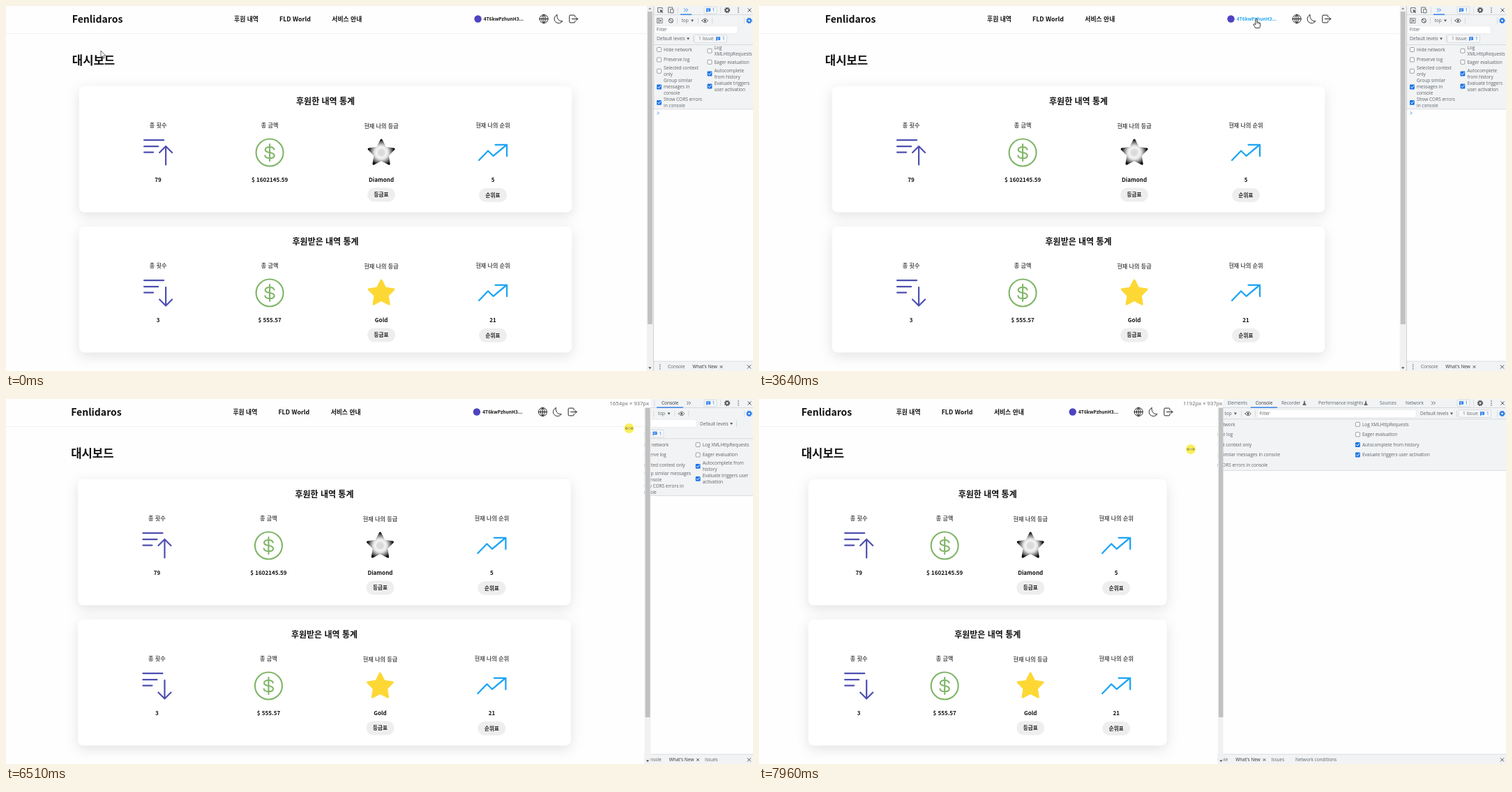
Animation, 1071 px wide and 523 px high, one loop 8 s. Source, as an HTML page:

```html
<!DOCTYPE html>
<html lang="ko">
<head>
<meta charset="utf-8">
<title>Dashboard resize</title>
<style>
html, body { margin: 0; width: 100%; height: 100%; overflow: hidden; background: #fefefe; }
svg { display: block; }
text { white-space: pre; }
.page text { font-family: "Noto Sans CJK KR", "Noto Sans KR", "Noto Sans CJK JP", "Noto Sans CJK", sans-serif; font-weight: 700; }
.ui text { font-family: "Open Sans", "Noto Sans", sans-serif; }
.card { fill: #fff; filter: drop-shadow(0 5px 9px rgba(0, 0, 0, .11)); }
</style>
</head>
<body>
<svg width="1071" height="523" viewBox="0 0 1071 523">
  <defs>
    <radialGradient id="diamond" gradientUnits="userSpaceOnUse" cx="0" cy="0" r="20">
      <stop offset="0" stop-color="#d8d8d8"/><stop offset=".25" stop-color="#dedede"/>
      <stop offset=".33" stop-color="#f6f6f6"/><stop offset=".5" stop-color="#e2e2e2"/>
      <stop offset=".72" stop-color="#7c7c7c"/><stop offset=".93" stop-color="#080808"/>
    </radialGradient>
  </defs>
  <rect width="1071" height="523" fill="#fefefe"/>
  <g id="panel" class="ui"></g>
  <svg id="view" height="523"><g id="page" class="page"></g><g id="chrome" class="ui"></g></svg>
  <g id="cursor"></g>
</svg>
<script>
const LOOP = 8000, SCALE = 1071 / 1920, RIGHT = 1071;
const BLUE = '#1a73e8', HOVER = '#1da5f2', GREY = '#5f6368', LINE = '#cdd0d4';

// Tracks: [time, value, ...] joined by straight segments.
const pointerTrack = [[0, 136, 64], [200, 136, 64], [970, 191, 18], [1800, 386, 18], [2360, 454, 19],
  [2640, 505, 19], [3500, 700, 19], [4330, 776, 18], [4610, 792, 18], [4810, 792, 18], [5020, 812, 18],
  [5220, 812, 18], [5840, 930, 35], [6300, 930, 35], [6510, 893.5, 42], [6840, 857.5, 52],
  [7090, 838, 58], [7360, 732, 66], [7960, 619, 72]];
// Values: viewport width, visible page edge, panel layout edge.
const resizeTrack = [[6300, 925.7, 928, 928], [6510, 922.6, 924.6, 894.5], [6840, 862.4, 859.3, 859.3],
  [7090, 851, 851, 841], [7360, 793.2, 794, 749], [7960, 664.9, 665.5, 627]];

function sample(track, t) {
  let i = track.findIndex(k => k[0] > t);
  if (i < 0) return track[track.length - 1].slice(1);
  if (i === 0) return track[0].slice(1);
  const a = track[i - 1], b = track[i], u = (t - a[0]) / (b[0] - a[0]);
  return a.slice(1).map((v, j) => v + (b[j + 1] - v) * u);
}

const text = (x, y, s, size, fill = '#111', anchor = 'start') =>
  `<text x="${x}" y="${y + size * .37}" font-size="${size}" fill="${fill}" text-anchor="${anchor}">${s}</text>`;
const rect = (x, y, w, h, fill, extra = '') =>
  `<rect x="${x}" y="${y}" width="${Math.max(0, w)}" height="${h}" fill="${fill}" ${extra}/>`;
const stroke = (d, color, width = 1) =>
  `<path d="${d}" fill="none" stroke="${color}" stroke-width="${width}" stroke-linecap="round" stroke-linejoin="round"/>`;
const fillPath = (d, color, extra = '') => `<path d="${d}" fill="${color}" ${extra}/>`;
const circle = (x, y, r, fill, extra = '') => `<circle cx="${x}" cy="${y}" r="${r}" fill="${fill}" ${extra}/>`;
const at = (x, y, s) => `<g transform="translate(${x} ${y})">${s}</g>`;

// Page

const star = fill => {
  const pts = Array.from({ length: 10 }, (_, i) => {
    const r = i % 2 ? 9.6 : 18.9, a = i * Math.PI / 5;
    return `${(r * Math.sin(a)).toFixed(2)},${(.9 - r * Math.cos(a)).toFixed(2)}`;
  });
  return `<polygon points="${pts.join(' ')}" fill="${fill}" stroke="${fill}" stroke-width="3" stroke-linejoin="round"/>`;
};
const listIcon = up => stroke('M-20 -17.8H8M-20 -8.8H0M-20 -.4H-7' +
  (up ? 'M11 17.5V-9M2 0L11 -9L20 0' : 'M11 -8V18.3M2 9.5L11 18.5L20 9.5'), '#4d4fb0', 2.2);
const dollarIcon = circle(0, 0, 19.5, 'none', 'stroke="#7fb566" stroke-width="2.1"') +
  stroke('M6.4 -4.4C5.6 -7 3.2 -8 0 -8C-4 -8 -6.4 -6.4 -6.4 -4C-6.4 -1.2 -3.4 -.6 0 0C4 .7 6.7 1.4 6.7 4.3C6.7 7 4 8.2 0 8.2C-3.6 8.2 -6.2 7 -6.7 4.4M0 -12V12', '#7fb566', 2.1);
const chartIcon = stroke('M-20 11L-7 -2.5L.5 4.8L19.5 -11M3.5 -11.2H20V5', HOVER, 2.3);

const cards = [
  { y: 0, title: '후원한 내역 통계', icons: [listIcon(true), dollarIcon, star('url(#diamond)'), chartIcon], values: ['79', '$ 1602145.59', 'Diamond', '5'] },
  { y: 201, title: '후원받은 내역 통계', icons: [listIcon(false), dollarIcon, star('#fdd835'), chartIcon], values: ['3', '$ 555.57', 'Gold', '21'] }
];
const labels = ['총 횟수', '총 금액', '현재 나의 등급', '현재 나의 순위'];
const buttons = ['', '', '등급표', '순위표'];

function card({ y, title, icons, values }, c, half, gap) {
  let s = rect(c - half, 115 + y, half * 2, 180.5, '#fff', 'rx="8" class="card"') +
    text(c, 137 + y, title, 12, '#111', 'middle');
  labels.forEach((label, i) => {
    const x = c + (i - 1.5) * gap, third = i === 2 ? .6 : 0;
    s += text(x, 171 + third + y, label, 8.15, '#555', 'middle') + at(x, 210 + y, icons[i]) +
      text(x, 249 + y, values[i], 8.05, '#111', 'middle');
    if (buttons[i]) {
      const by = 271 - third + y;
      s += rect(x - 20, by - 10, 40, 20, '#eee', 'rx="10"') + text(x, by, buttons[i], 7.6, '#222', 'middle');
    }
  });
  return s;
}

const globe = 'M-6 0A6 6 0 1 0 6 0A6 6 0 1 0 -6 0ZM-6 0H6M0 -6V6M0 -6C-4 -3 -4 3 0 6M0 -6C4 -3 4 3 0 6';
const moon = 'M-2.2 -5.7C-2.5 0 1 4 5.8 3C4 6.2 -.8 7.2 -4 4.4C-7.4 1.2 -6 -4 -2.2 -5.7Z';
const logout = 'M2 -2.6V-4.2Q2 -5.4 .8 -5.4H-4.8Q-6 -5.4 -6 -4.2V4.2Q-6 5.4 -4.8 5.4H.8Q2 5.4 2 4.2V2.6M-2.4 0H6M3.6 -2.4L6 0L3.6 2.4';

function drawPage(width, hot) {
  const c = width / 2 - 1, wide = width > 803;
  const half = wide ? 353.3 : 257, gap = wide ? 160 : 123;
  const edge = half + 10, shift = wide ? 0 : -96.5;
  const ink = name => hot === name ? HOVER : '#111';
  const icon = (dx, d, name) => at(c + dx + shift, 18.5, stroke(d, hot === name ? HOVER : '#222'));
  return rect(0, 0, width, 523, '#fefefe') + rect(0, 39, width, .7, '#ececec') +
    text(c - edge, 19, 'Fenlidaros', 14) +
    text(c - 131, 19, '후원 내역', 8.8, ink('nav1')) +
    text(c - 66, 19, 'FLD World', 8.8, ink('nav2')) +
    text(c + 9.2, 19, '서비스 안내', 8.8, ink('nav3')) +
    circle(c + 218.5 + shift, 18.5, 5.2, '#4e44c0') +
    text(c + 226.7 + shift, 18.7, '4T6kwPzhunH3...', 6.6, ink('wallet')) +
    icon(313, globe, 'globe') + icon(334, moon, 'moon') + icon(355.7, logout, 'logout') +
    text(c - edge, 77.5, '대시보드', 16.7) +
    cards.map(k => card(k, c, half, gap)).join('');
}

const urls = [[1560, 'donation'], [1870, 'fld-world'], [2440, 'service'], [3000, '']];

function drawChrome(t, width, frame, thumbHot) {
  let s = rect(width + .6, 0, 10, 523, '#f1f1f1') +
    rect(width + 1.6, 8, 7, 448, thumbHot ? '#a8a8a8' : '#c1c1c1') +
    fillPath(`M${width + 2.8} 4.8h4.4l-2.2 -2.5z`, '#888') +
    fillPath(`M${width + 2.8} 517.5h4.4l-2.2 2.5z`, '#444');
  const link = urls.filter(u => u[0] <= t).pop();
  if (link && link[1]) {
    const url = 'https://fenlidaros.net/' + link[1];
    s += rect(-1, 512, url.length * 3 + 6, 12, '#e6e8eb', `stroke="${LINE}" stroke-width=".6"`) +
      text(.8, 518, url, 6.6, GREY);
  }
  if (t >= 6330) {
    const size = `${Math.round(frame / SCALE)}px × 937px`;
    s += rect(frame - 59, 0, 62, 12.5, '#fefefe') + text(frame - .5, 6, size, 7.7, '#666', 'end');
  }
  return s;
}

// Developer panel

const small = (x, y, s, fill = GREY) => text(x, y, s, 6.5, fill);
const separator = (x, y) => rect(x, y - 4.5, .7, 9, LINE);
const cross = (x, y, r = 2.3) => stroke(`M${x - r} ${y - r}l${2 * r} ${2 * r}m0 ${-2 * r}l${-2 * r} ${2 * r}`, '#555', 1);
const dots = (x, y) => [-3, 0, 3].map(d => circle(x, y + d, .8, '#555')).join('');
const gear = (x, y, color) => circle(x, y, 2.3, 'none', `stroke="${color}" stroke-width="1.7"`) +
  circle(x, y, 3.6, 'none', `stroke="${color}" stroke-width="1.3" stroke-dasharray="1.6 1.23"`);
const caret = (x, y) => fillPath(`M${x} ${y - 1.6}h4l-2 3.4z`, '#555');
const bubble = (x, y) => fillPath(`M${x} ${y - 2.7}h6v4.5h-4.5l-1.5 1.5z`, BLUE) +
  stroke(`M${x + 1.3} ${y - 1.2}h3.4m-3.4 1.6h2.4`, '#fff', .6);
const flask = x => fillPath(`M${x - .8} 2.8h1.6v2.2l2 4h-5.6l2 -4z`, '#666');

const layouts = [
  { end: 147.5,
    left: [[62.5, 'Hide network'], [77, 'Preserve log'], [93.3, 'Selected context/only'],
      [116, 'Group similar/messages in/console'], [138.3, 'Show CORS errors/in console']],
    right: [[64.3, 'Log/XMLHttpRequests'], [80.3, 'Eager evaluation'], [97, 'Autocomplete/from history'], [115, 'Evaluate triggers/user activation']] },
  { end: 138,
    left: [[65.5, 'Hide network'], [80, 'Preserve log'], [95, 'Selected context only'],
      [111, 'Group similar messages/in console'], [129, 'Show CORS errors in/console']],
    right: [[65.5, 'Log XMLHttpRequests'], [80, 'Eager evaluation'], [96.3, 'Autocomplete from/history'], [114.3, 'Evaluate triggers user/activation']] },
  { end: 120,
    left: [[51, 'Hide network'], [65.5, 'Preserve log'], [80, 'Selected context only'],
      [96.3, 'Group similar messages in/console'], [112.8, 'Show CORS errors in console']],
    right: [[51, 'Log XMLHttpRequests'], [65.5, 'Eager evaluation'], [80, 'Autocomplete from history'], [96.3, 'Evaluate triggers user/activation']] },
  { end: 102,
    left: [[36.3, 'Hide network'], [50.8, 'Preserve log'], [65.5, 'Selected context only'],
      [80, 'Group similar messages in console'], [95, 'Show CORS errors in console']],
    right: [[36.3, 'Log XMLHttpRequests'], [50.8, 'Eager evaluation'], [65.5, 'Autocomplete from history'], [80, 'Evaluate triggers user activation']] }
];

function option(x, [y, label]) {
  const on = /^(Group|Show|Auto|Eval)/.test(label), lines = label.split('/');
  const box = on
    ? rect(x, y - 3.4, 6.8, 6.8, BLUE, 'rx="1"') + stroke(`M${x + 1.5} ${y}l1.5 1.6l2.5 -3.2`, '#fff', 1)
    : rect(x + .4, y - 3, 6, 6, '#fff', 'rx="1" stroke="#777" stroke-width=".7"');
  return box + lines.map((line, i) => small(x + 10, y + (i - (lines.length - 1) / 2) * 9, line)).join('');
}

function tabs(x, mode) {
  const consoleX = mode === 1 ? 45.5 : 85;
  const names = [['Elements', 45, 2], ['Console', consoleX, 1], ['Recorder', 122, 3],
    ['Performance insights', 175, 4], ['Sources', 263, 4], ['Network', 300, 4]];
  const more = x + [47, 84.5, 123.3, 176.5, 340][mode];
  let s = names.filter(n => mode >= n[2])
    .map(([name, dx]) => small(x + dx, 6, name, name === 'Console' ? '#333' : GREY)).join('');
  if (mode >= 3) s += flask(x + 155);
  if (mode >= 4) s += flask(x + 243);
  s += stroke(`M${more - 2.5} 3.8l2 2l-2 2m3 -4l2 2l-2 2`, mode ? '#555' : BLUE, .9);
  return s + (mode ? rect(x + consoleX - 7, 11.5, 38, 1.3, BLUE) : rect(more - 8, 11.5, 16, 1.3, BLUE));
}

function drawPanel(x) {
  const width = RIGHT - x;
  const mode = [160, 195, 265, 400].filter(w => width >= w).length;
  const rows = Math.min(mode, 3), layout = layouts[rows];
  const filter = [[x + 2, 1049, 34], [x + 2, 990, 35], [x + 87, 1049, 21], [x + 88, 942, 21]][rows];
  const levels = [[x + 5, 47], [995, 35.5], [x + 5, 35.5], [948, 21]][rows];
  const issue = [[x + 59, 47], [x + 2, 49.5], [x + 60, 35.5], [1003, 21]][rows];
  const top = [55, 56.5, 42, 28.5][rows];

  let s = rect(x, 0, width, 523, '#fefefe') + rect(x, 0, width, layout.end, '#f1f3f4') +
    [12.3, top, layout.end].map(y => rect(x, y, width, .7, LINE)).join('') +
    stroke(`M${x + 13} 5V2.5h-6.5v6.5h2.5`, '#666', .9) + fillPath(`M${x + 9.5} 5l5 2l-2 .8l1.5 1.7l-1 .8l-1.4 -1.7l-1 1.6z`, '#555') +
    stroke(`M${x + 23} 9.5h-1.5v-7.5h6v2M${x + 25} 4.8h4v5h-4z`, '#666', .9) + separator(x + 35, 6) + tabs(x, mode) +
    rect(1001, 1.2, 18, 9.6, '#f7f8f9', `rx="1" stroke="${LINE}" stroke-width=".7"`) + bubble(1004, 6) + small(1012.5, 6, '1', BLUE) +
    separator(1024, 6) + gear(1034, 6, '#555') + dots(1050, 6) + cross(1066, 6);

  s += rect(x + 5.5, 17.8, 7.5, 6.4, 'none', 'stroke="#666" stroke-width=".8"') + stroke(`M${x + 7.8} 18v6`, '#666', .8) +
    fillPath(`M${x + 9.3} 19.3l2.5 1.7l-2.5 1.7z`, '#555') +
    circle(x + 25.3, 21, 3.1, 'none', 'stroke="#555" stroke-width="1"') + stroke(`M${x + 23.2} 18.9l4.2 4.2`, '#555') +
    separator(x + 34, 21) + small(x + 40.5, 21, 'top') + caret(x + 54, 21) + separator(x + 64, 21) +
    stroke(`M${x + 70} 21q4.2 -5.6 8.4 0q-4.2 5.6 -8.4 0z`, '#555', .9) + circle(x + 74.2, 21, 1.5, '#555') +
    separator(x + 84, 21) + separator(1058, 21) + gear(1065.5, 21, BLUE);

  const [fx, fr, fy] = filter;
  s += rect(fx, fy - 5.7, fr - fx, 11.4, '#fff', 'stroke="#e3e5e8" stroke-width=".6"') + small(fx + 2.5, fy, 'Filter') +
    small(levels[0], levels[1], 'Default levels') + caret(levels[0] + 43, levels[1]) + separator(levels[0] + 52, levels[1]) +
    rect(issue[0], issue[1] - 5.3, 46.5, 10.6, '#f7f8f9', `rx="1" stroke="${LINE}" stroke-width=".7"`) +
    small(issue[0] + 6, issue[1], '1 Issue:') + bubble(issue[0] + 31, issue[1]) + small(issue[0] + 40, issue[1], '1', BLUE);

  s += layout.left.map(o => option(x + 5, o)).join('') +
    layout.right.map(o => option(x + width / 2 + 6, o)).join('') +
    stroke(`M${x + 6.2} ${layout.end + 4.2}l1.7 1.7l-1.7 1.7`, BLUE, .9);

  s += rect(x, 509, width, 14, '#f1f3f4') + rect(x, 508.7, width, .7, LINE) + dots(x + 9.7, 517) +
    small(x + 21, 517, 'Console') + small(x + 56.3, 517, "What's New", '#333') + cross(x + 97.5, 517, 1.6) +
    (mode >= 1 ? small(x + 107.5, 517, 'Issues') : '') + (mode >= 3 ? small(x + 142, 517, 'Network conditions') : '') +
    cross(1065.5, 517);
  return s + rect(x, 0, .8, 523, '#c4c7cb');
}

// Pointer

const arrow = fillPath('M0 0V9.6L2.2 7.7L3.7 11L5.3 10.3L3.8 7.1H6.7Z', '#fff', 'stroke="#444" stroke-width=".8"');
const hand = fillPath('M-1.1 0Q0 -1.4 1.1 0V4.2Q2.2 3.6 2.9 4.6Q4 4.2 4.5 5.2Q5.7 5 5.8 6.4V9Q5.6 11 4.6 12.6H-1.2Q-2.4 10.2 -4 8.2Q-4 6.4 -2.4 7L-1.1 8.2Z',
  '#fff', 'stroke="#222" stroke-width=".9"') + stroke('M1.1 4.2V6.4M2.9 4.8V6.6M4.5 5.4V6.8', '#222', .6);
const resize = stroke('M-5.2 0H5.2M-3.4 -1.9L-5.3 0L-3.4 1.9M3.4 -1.9L5.3 0L3.4 1.9', '#9a8a34', 1) +
  rect(-1, -1.2, 2, 2.4, '#fff', 'stroke="#9a8a34" stroke-width=".5"');
const zones = { nav1: [327, 361], nav2: [392, 436], nav3: [467, 509], wallet: [672, 738], globe: [765, 779], moon: [785, 799], logout: [806, 821] };

function drawCursor(t, x, y, hot) {
  if (x >= 928 || t > 5840) {
    return at(x, y, (t >= 6110 ? circle(0, 0, 7, '#f8ee4a', 'fill-opacity=".9"') : '') + resize);
  }
  return at(x, y, hot ? hand : arrow);
}

const shown = {};
function put(id, markup) {
  if (shown[id] === markup) return;
  shown[id] = markup;
  document.getElementById(id).innerHTML = markup;
}

function render(t) {
  const [px, py] = sample(pointerTrack, t);
  const [frame, edge, panelX] = sample(resizeTrack, t);
  const width = frame - 7.5;
  const hot = t < 6000 && py < 25 && Object.keys(zones).find(k => px >= zones[k][0] && px <= zones[k][1]);
  put('panel', drawPanel(panelX));
  put('page', drawPage(width, hot));
  put('chrome', drawChrome(t, width, frame, t < 6000 && px >= 919 && px < 928));
  put('cursor', drawCursor(t, px, py, hot));
  document.getElementById('view').setAttribute('width', edge);
}

const start = performance.now();
function tick() {
  render((performance.now() - start) % LOOP);
  requestAnimationFrame(tick);
}
render(0);
requestAnimationFrame(tick);
</script>
</body>
</html>
```
